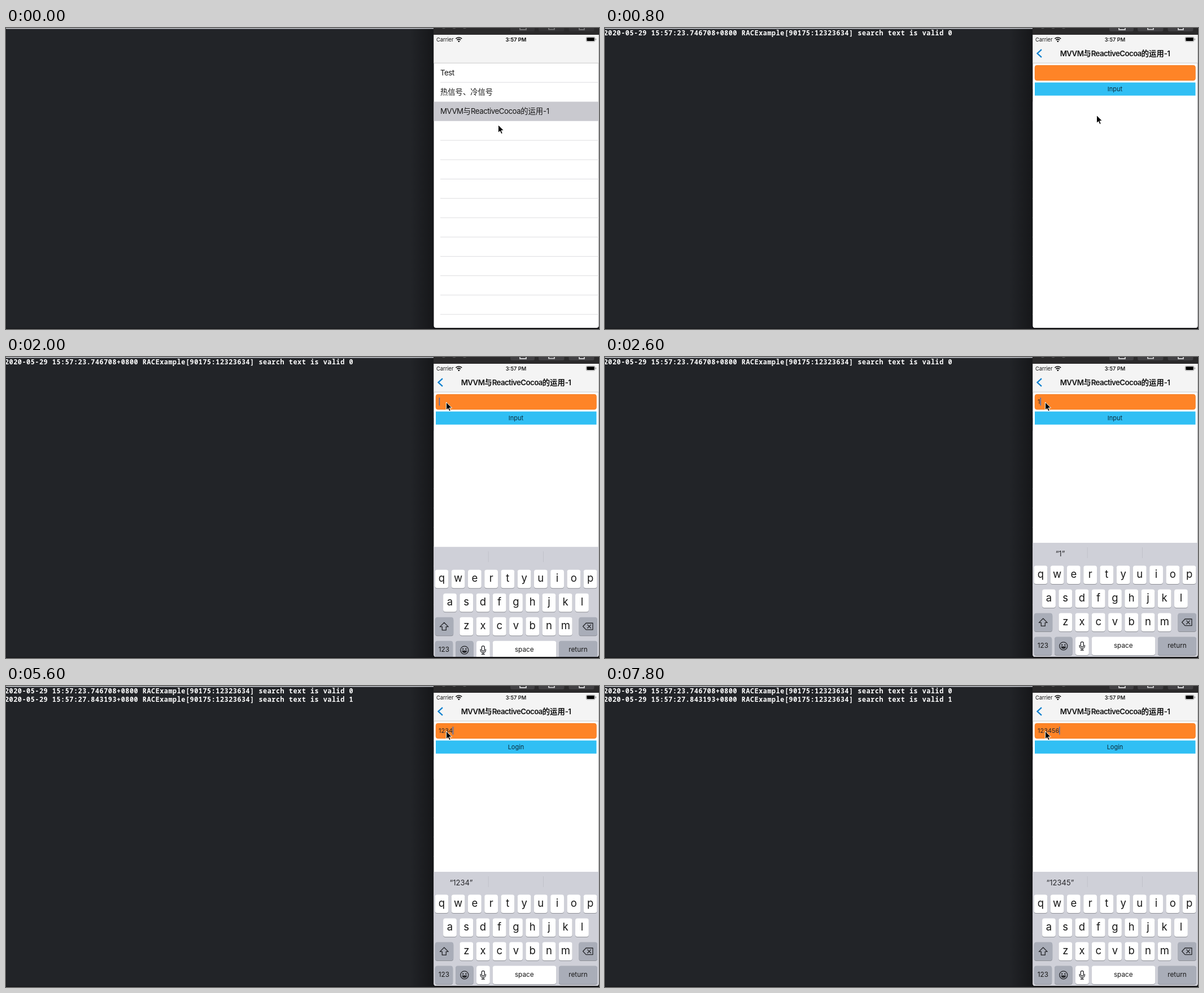
These frames come from a looping animation (1050x533 px, 8 s). An HTML page:

```html
<!DOCTYPE html>
<html lang="en">
<head>
<meta charset="utf-8">
<title>Login form demo</title>
<style>
  html, body { margin: 0; width: 100%; height: 100%; overflow: hidden; background: #222428; }
  svg { display: block; width: 1050px; height: 533px; font-family: Inter, "Noto Sans CJK SC", "Noto Sans CJK", sans-serif; }
  text { white-space: pre; }
  .mid { text-anchor: middle; }
  .latin { letter-spacing: -.037em; }
  .row { font-size: 13.3px; fill: #161616; }
  .title { font-size: 13.3px; font-weight: 600; fill: #111; }
  .title .latin { letter-spacing: -.045em; }
  .log { font: 700 11.8px "Noto Sans Mono", "DejaVu Sans Mono", monospace; letter-spacing: .54px; fill: #fff; }
  .small { font-size: 11px; }
  .key { font-size: 18.5px; fill: #181818; }
  .line { fill: none; stroke: #25262a; stroke-width: 1.3; stroke-linejoin: round; stroke-linecap: round; }
</style>
</head>
<body>
<svg id="stage" viewBox="0 0 1050 533">
  <defs>
    <clipPath id="screen"><path d="M757.5 12H1049.5V527a4 4 0 0 1-4 4H761.5a4 4 0 0 1-4-4Z"/></clipPath>
    <linearGradient id="shade"><stop offset="0" stop-opacity="0"/><stop offset="1" stop-opacity=".38"/></linearGradient>
  </defs>
  <rect width="1050" height="533" fill="#222428"/>
  <rect width="757" height="1.6" fill="#c3c5ca"/>
  <rect width="1" y="1.6" height="532" fill="#1a1b1e"/>
  <rect x="715" y="1.6" width="43" height="531.4" fill="url(#shade)"/>
  <rect y="531.6" width="1050" height="1.4" fill="#17181b"/>
  <rect x="757" y="0" width="293" height="533" fill="#121214"/>
  <text class="log" id="log1" x="-2" y="13">2020-05-29 15:57:23.746708+0800 RACExample[90175:12323634] search text is valid 0</text>
  <text class="log" id="log2" x="-2" y="28">2020-05-29 15:57:27.843193+0800 RACExample[90175:12323634] search text is valid 1</text>

  <rect x="757" width="292.5" height="12" fill="#2b2a2b"/>
  <g fill="#5b5a5c"><circle cx="775" cy="-3.4" r="4.6"/><circle cx="793.5" cy="-3.4" r="4.6"/><circle cx="812" cy="-3.4" r="4.6"/></g>
  <g id="tools"></g>

  <g clip-path="url(#screen)">
    <rect x="757" y="12" width="293" height="520" fill="#fff"/>
    <g id="list"></g>
    <g id="form">
      <rect x="757.5" y="62" width="292" height="470" fill="#fff"/>
      <rect x="761" y="66" width="284.5" height="27" rx="4" fill="#fe8427" stroke="#e7731d" stroke-width=".5"/>
      <text class="small" id="field" x="766" y="83" fill="#26262a"></text>
      <rect id="caret" y="72" width="1.6" height="14" fill="#4a70b5"/>
      <rect x="761" y="96.5" width="284.5" height="23.2" fill="#31bff4"/>
      <text class="small mid" id="button" x="903" y="112" fill="#0c2a38"></text>
    </g>
    <rect x="757" y="12" width="293" height="50" fill="#f4f4f4"/>
    <rect x="757" y="61.6" width="293" height="1" fill="#cbcbcb"/>
    <g id="nav">
      <path id="back" d="M773 38.2L765.5 45L773 51.8" fill="none" stroke="#0c80cf" stroke-width="2.3"/>
      <text id="title" class="title mid" x="903" y="49.6"></text>
    </g>
    <text x="762" y="23.6" font-size="9.3" fill="#111">Carrier</text>
    <g fill="none" stroke="#000" stroke-width="1.7">
      <path d="M796.4 19a7.6 7.6 0 0 1 10.8 0M798.6 21.3a4.5 4.5 0 0 1 6.4 0"/>
      <circle cx="801.8" cy="23.6" r=".6"/>
    </g>
    <text id="clock" class="mid" x="903" y="23.6" font-size="9.3" fill="#000">3:57 PM</text>
    <rect x="1027.3" y="16" width="15.6" height="8" rx="2" fill="#fff" stroke="#777" stroke-width=".7"/>
    <rect x="1028.4" y="17" width="13.4" height="6" rx="1.2"/>
    <rect x="1043.8" y="18.6" width="1" height="2.8" rx=".5" fill="#777"/>
    <g id="keys"></g>
  </g>
  <path id="cursor" d="M0 0V14L3.2 11L5.4 16L7.8 15L5.6 10.1H10Z" stroke="#fff" stroke-width="1" stroke-linejoin="round"/>
</svg>
<script>
const LOOP = 8000, STEP = 200, KEYBOARD = 203;
const $ = id => document.getElementById(id);
const clamp = v => Math.max(0, Math.min(1, v));
const HEADING = 'MVVM与ReactiveCocoa的运用-1';

// Tighten Latin runs only; CJK keeps its full advance.
const mixed = s => s.replace(/[\x21-\x7e]+/g, m => `<tspan class="latin">${m}</tspan>`);
const rect = (x, y, w, h, fill, r = 0) =>
  `<rect x="${x}" y="${y}" width="${w}" height="${h}" rx="${r}" fill="${fill}"/>`;

function buildTools() {
  const icons = ['M910 -4V3H921V-4', 'M961 -4V2.6H971V-4', 'M1015 -4V3H1024V-4'];
  $('tools').innerHTML = [[893, 43], [943, 45.5], [996.5, 45]].map(([x, w], i) =>
    rect(x, -8, w, 14, '#414043', 3) + `<path d="${icons[i]}" fill="none" stroke="#d2d2d4" stroke-width="1.8"/>`).join('');
}

function buildList() {
  const top = 62, pitch = 34.24;
  let s = rect(757, top + pitch * 2, 293, pitch, '#c9c9cf');
  for (let i = 1; i < 14; i++)
    if (i !== 2 && i !== 3) s += rect(769, top + pitch * i - .5, 281, 1, '#dedee0');
  ['Test', '热信号、冷信号', HEADING].forEach((t, i) =>
    s += `<text class="row" x="769" y="${84 + pitch * i}">${mixed(t)}</text>`);
  $('list').innerHTML = s;
}

function buildKeys() {
  const gray = '#a9adb8', pitch = 29.24;
  const cap = (x, y, w, fill = '#fff') => rect(x, y + 1, w, 32.4, '#8e9097', 4) + rect(x, y, w, 32.4, fill, 4);
  const word = (x, t) => `<text class="mid" x="${x}" y="515.2" font-size="11.8" fill="#181818">${t}</text>`;
  let s = rect(757, 329, 293, 203, '#cfd0d8') +
    rect(853.7, 337, .9, 19, '#bfc0c8') + rect(951, 337, .9, 19, '#bfc0c8') +
    '<text class="mid" id="hint" x="806" y="352.8" font-size="13" fill="#26262a"></text>';
  [['qwertyuiop', 771.4], ['asdfghjkl', 786], ['zxcvbnm', 815.3]].forEach(([row, x0], r) => {
    const y = 369.6 + r * 42;
    [...row].forEach((c, i) => {
      const x = x0 + i * pitch;
      s += cap(x - 11.9, y, 23.8) + `<text class="key mid" x="${x}" y="${y + 21.6}">${c}</text>`;
    });
  });
  s += cap(759.8, 453.6, 32.4, gray) + cap(1014.4, 453.6, 32.6, gray) +
    '<path class="line" d="M775.8 463L783.2 470.4H779.3V476.4H772.3V470.4H768.4Z"/>' +
    '<path class="line" d="M1021.6 469.8L1027 464H1039V475.6H1027ZM1029.7 466.9L1035.5 472.7M1035.5 466.9L1029.7 472.7"/>';
  s += cap(759.8, 495.6, 31.4, gray) + word(775.3, '123') +
    cap(796, 495.6, 31.6, gray) + cap(833, 495.6, 23.8) +
    cap(861.8, 495.6, 112.4) + word(917.8, 'space') +
    cap(979, 495.6, 68, gray) + word(1013, 'return');
  s += '<circle class="line" cx="811.8" cy="511.8" r="7"/><circle cx="809.2" cy="509.8" r="1.1"/><circle cx="814.4" cy="509.8" r="1.1"/>' +
    '<path d="M807.3 512.6H816.3A4.5 4.2 0 0 1 807.3 512.6Z" fill="#25262a"/>' +
    '<rect class="line" x="842.3" y="504.4" width="5" height="9" rx="2.5"/>' +
    '<path class="line" d="M840.2 510.4V512A4.6 4.2 0 0 0 849.4 512V510.4M844.8 516.2V519M842.3 519H847.3"/>';
  $('keys').innerHTML = s;
}

// Each table holds [start time, value]; the last started entry counts.
const at = (table, t) => table.filter(e => e[0] <= t).pop()[1];
const typed = [[0, 0], [2600, 1], [3000, 2], [3400, 3], [4400, 4], [6400, 5], [7800, 6]];
const hinted = [[0, 0], [2600, 1], [3000, 2], [3600, 3], [4600, 4], [6600, 5]];
const caretAlpha = [[0, 0], [1800, .6], [2000, 1], [3800, .5], [4000, 0], [4400, 1], [5000, .5],
  [5200, 0], [5600, 1], [6000, .4], [6200, 0], [6400, 1], [7000, .4], [7200, 0], [7400, 1]];
const pointer = [[0, 871.5, 171.5], [200, 871.5, 171.5], [800, 870.5, 154.5], [1000, 870.5, 154.5],
  [1600, 779.5, 80], [LOOP, 779.5, 80]];

function pointerAt(t) {
  const i = pointer.findIndex(p => p[0] > t);
  const [t0, x0, y0] = pointer[i - 1], [t1, x1, y1] = pointer[i];
  const u = (t - t0) / (t1 - t0), k = u * u * (3 - 2 * u);
  return [x0 + (x1 - x0) * k, y0 + (y1 - y0) * k];
}

const move = (id, x, y) => $(id).setAttribute('transform', `translate(${x.toFixed(2)} ${y.toFixed(2)})`);

function draw(t) {
  const push = t < STEP ? 0 : 1 - Math.pow(1 - clamp((t - 100) / 500), 3);
  move('list', -88 * push, 0);
  move('form', 292 * (1 - push), 0);
  move('title', 146 * (1 - push), 0);
  $('nav').style.opacity = push;
  $('tools').style.opacity = t < STEP ? .45 : 1;
  $('clock').style.fontWeight = t < STEP ? 600 : 500;

  $('log1').style.opacity = +(t >= 400);
  $('log2').style.opacity = +(t >= 4400);

  const drop = t < 1600 ? KEYBOARD : t >= 2200 ? 0 : KEYBOARD * Math.exp((1600 - t) / 120);
  move('keys', 0, drop);

  const n = at(typed, t), h = at(hinted, t);
  $('field').textContent = '123456'.slice(0, n);
  $('hint').textContent = h ? `“${'12345'.slice(0, h)}”` : '';
  $('button').textContent = n > 3 ? 'Login' : 'Input';
  $('caret').setAttribute('x', n ? 763.8 + 6.7 * n : 766.6);
  $('caret').style.opacity = at(caretAlpha, t);
  move('cursor', ...pointerAt(t));
}

buildTools();
buildList();
buildKeys();
$('title').innerHTML = mixed(HEADING);

const start = performance.now();
function tick() {
  const t = (performance.now() - start) % LOOP;
  draw(Math.floor(t / STEP) * STEP);
  requestAnimationFrame(tick);
}
tick();
</script>
</body>
</html>
```
